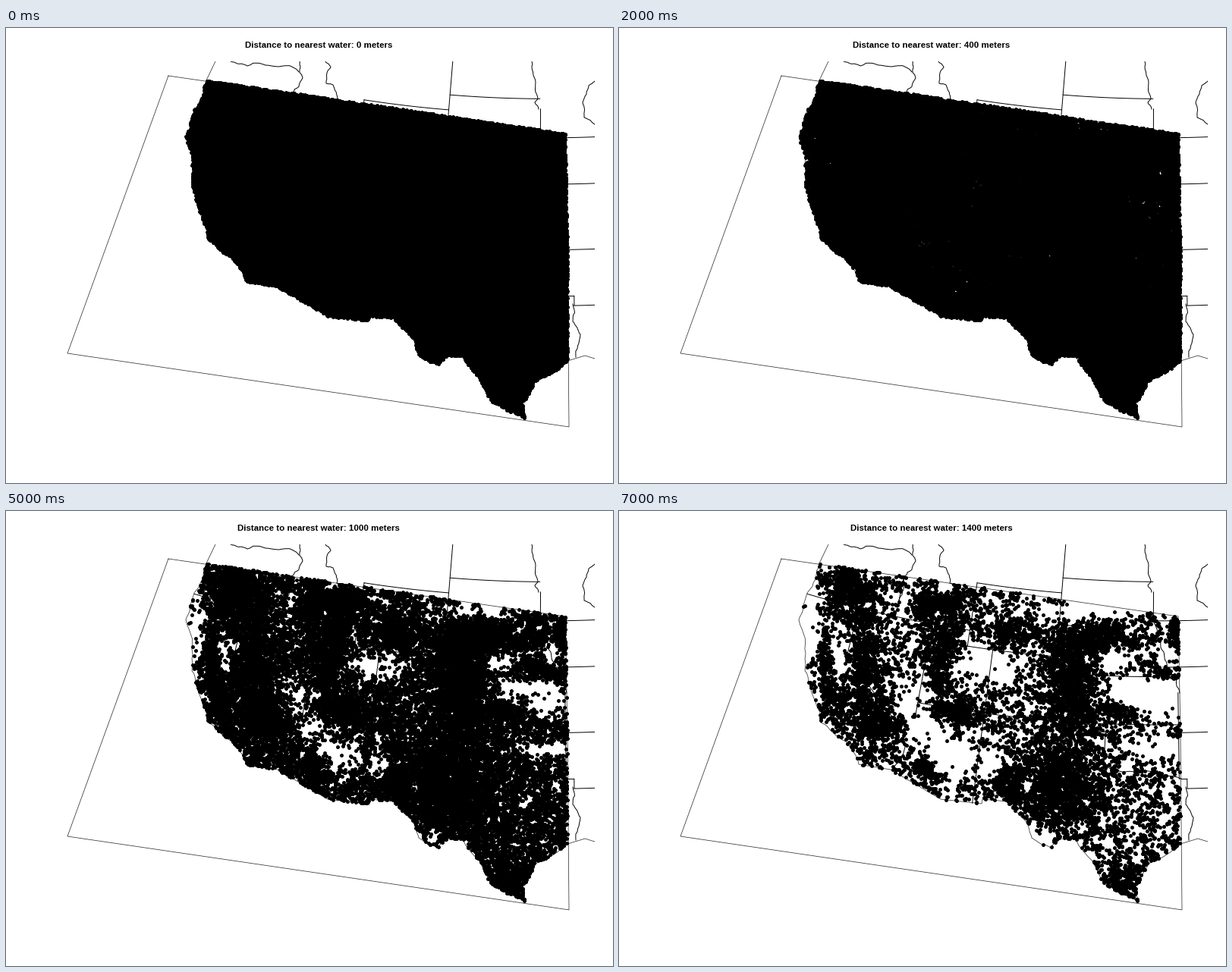
Animation of 800 by 600 pixels, one loop 8 s. Source, as a matplotlib script:

```python
import numpy as np
import matplotlib.pyplot as plt
from matplotlib.animation import FuncAnimation
from matplotlib.path import Path

W, H, DPI = 800, 600, 100
MAP_RIGHT, MAP_TOP = 776, 44
STEP = 200          # meters added per frame
FRAMES = 8
BASE = 1000         # typical distance to water in meters
rng = np.random.default_rng(4)


def project(lon, lat):
    """Conic projection from degrees west and north to stage pixels."""
    angle = np.radians(0.583 * (lon - 96))
    radius = 1745 - 21.1 * (lat - 37)
    return 712.5 - radius * np.sin(angle), radius * np.cos(angle) - 1463


def border(lon1, lat1, lon2, lat2):
    return project(np.linspace(lon1, lon2, 20), np.linspace(lat1, lat2, 20))


def wiggle(points, rough=0.09, depth=3):
    """Natural line through key points, by midpoint displacement."""
    pts = np.array(points, float)
    for _ in range(depth):
        step = np.diff(pts, axis=0)
        side = step[:, ::-1] * (1, -1) * rng.uniform(-rough, rough, (len(step), 1))
        mid = pts[:-1] + step / 2 + side
        pts = np.vstack([np.stack([pts[:-1], mid], axis=1).reshape(-1, 2), pts[-1:]])
    return pts


def bumps(pts, spots):
    """Sum of Gaussian spots given as x, y, width, height."""
    return sum(np.exp(-((pts - (x, y)) ** 2 / (2 * np.array([w, h]) ** 2)).sum(axis=1))
               for x, y, w, h in spots)


def clumps(pts, waves=80):
    """Smooth random field with unit variance."""
    k = 2 * np.pi / rng.uniform(9, 38, waves)
    ang, phase = rng.uniform(0, 2 * np.pi, (2, waves))
    field = np.cos(pts @ np.array([k * np.cos(ang), k * np.sin(ang)]) + phase)
    return field.sum(axis=1) / np.sqrt(waves / 2)


# Study area and coasts
study_box = [(214, 63), (737, 139), (740, 292), (742, 526), (81, 429), (214, 63)]
west = wiggle([(264, 69), (248, 108), (237, 143), (245, 195), (250, 226),
               (266, 279), (299, 304), (316, 334)])
south = [(316, 334), (358, 341), (424, 380), (478, 386), (479, 380), (512, 383)]
rio = wiggle([(512, 383), (536, 409), (544, 431), (569, 444), (582, 432),
              (602, 433), (641, 493), (684, 515)], 0.06)
gulf = wiggle([(684, 515), (681, 495), (700, 464), (740, 439)], 0.06)
shore = np.vstack([west, south, rio, gulf])
coast = np.vstack([[(276, 44)], shore, [(763, 432), (776, 436)]])

# State borders: parallels (lat, from, to) and meridians (lon, from, to)
parallels = [(45.94, 104.05, 96.56), (45, 111.05, 104.05), (43.5, 96.5, 91),
             (43, 104.05, 98.5), (42, 124.2, 111.05), (41, 111.05, 102.05),
             (40.6, 95.75, 91), (40, 102.05, 95.3), (37, 114.05, 94.62),
             (36.5, 103.04, 100), (36.5, 94.62, 90), (33, 94.04, 91)]
meridians = [(120, 42, 39), (117.03, 44.5, 42), (114.05, 42, 36.2), (111.05, 45, 41),
             (109.05, 41, 31.33), (104.05, 49, 41), (103.04, 37, 32), (102.05, 41, 37),
             (100, 36.5, 34.5), (96.5, 45.3, 43.5), (94.6, 39, 33.6), (94.04, 33.6, 33)]
diagonals = [(120, 39, 114.6, 35), (94.5, 33.6, 94.04, 33.6)]
rivers = [
    [(296, 44), (318, 50), (350, 50), (386, 58)],
    [(387, 44), (387, 58), (391, 66), (377, 86), (369, 118)],
    [(421, 44), (428, 52), (422, 73), (431, 75), (436, 95), (470, 104)],
    [(693, 44), (698, 72), (701, 93), (697, 98), (702, 107)],
    [(776, 70), (768, 76), (760, 98), (762, 118), (776, 127)],
    [(702, 144), (714, 180), (722, 206), (739, 240)],
    [(624, 328), (690, 343), (741, 353)],
    [(747, 364), (747, 387), (757, 404), (751, 434)],
    [(373, 292), (376, 315), (360, 343)],
]

# Spots where water is far away, and where it is near
dry = [(305, 102, 20, 26), (395, 126, 16, 8), (438, 122, 18, 10), (270, 190, 5, 20),
       (287, 245, 8, 18), (326, 205, 12, 42), (345, 284, 20, 16), (424, 185, 14, 32),
       (515, 162, 18, 12), (595, 185, 22, 18), (640, 165, 26, 11), (600, 245, 24, 30),
       (578, 362, 34, 38), (514, 360, 13, 18), (665, 492, 20, 16), (445, 265, 20, 12),
       (733, 158, 6, 18), (662, 262, 16, 6), (405, 340, 10, 14), (715, 214, 14, 6)]
wet = [(680, 236, 34, 12), (712, 250, 18, 18), (650, 196, 15, 8), (720, 188, 8, 12),
       (710, 315, 26, 8), (289, 190, 5, 20), (250, 145, 9, 40), (440, 322, 22, 16),
       (492, 338, 10, 10), (538, 360, 7, 7), (385, 242, 11, 16), (402, 285, 14, 14),
       (485, 203, 30, 14), (620, 128, 45, 8), (552, 432, 12, 8), (375, 124, 8, 9)]

# Jittered sites inside the study area, each with its distance to water
sites = np.mgrid[230:746:1.6, 60:522:1.6].reshape(2, -1).T
sites = sites + rng.uniform(-1.5, 1.5, sites.shape)
sites = sites[Path(np.vstack([shore, [(740, 292), (737, 139)]])).contains_points(sites)]
level = 0.7 * bumps(sites, dry) - 0.65 * bumps(sites, wet)
scale = BASE * np.exp(np.clip(level, -0.6, 0.6) + 0.17 * clumps(sites))
distance = scale * rng.exponential(size=len(sites)) ** 0.43

fig = plt.figure(figsize=(W / DPI, H / DPI), dpi=DPI, facecolor="white")
ax = fig.add_axes([0, 0, MAP_RIGHT / W, 1 - MAP_TOP / H])
ax.set(xlim=(0, MAP_RIGHT), ylim=(H, MAP_TOP))
ax.axis("off")

for line in (study_box, coast):
    ax.plot(*np.transpose(line), color="#333333", lw=0.55)
borders = [border(a, lat, b, lat) for lat, a, b in parallels]
borders += [border(lon, a, lon, b) for lon, a, b in meridians]
borders += [border(*ends) for ends in diagonals]
borders += [wiggle(river, 0.12).T for river in rivers]
for line in borders:
    ax.plot(*line, color="black", lw=0.7)

dots, = ax.plot([], [], "o", color="black", ms=3.6, mew=0)
title = fig.text(411.7 / W, 1 - 26.5 / H, "", ha="center", va="baseline",
                 fontsize=8.28, family="Liberation Sans", weight="bold")


def update(i):
    limit = i * STEP
    dots.set_data(*sites[distance >= limit].T)
    title.set_text(f"Distance to nearest water: {limit} meters")
    return dots, title


anim = FuncAnimation(fig, update, frames=FRAMES, interval=1000, repeat=True)
plt.show()
```
